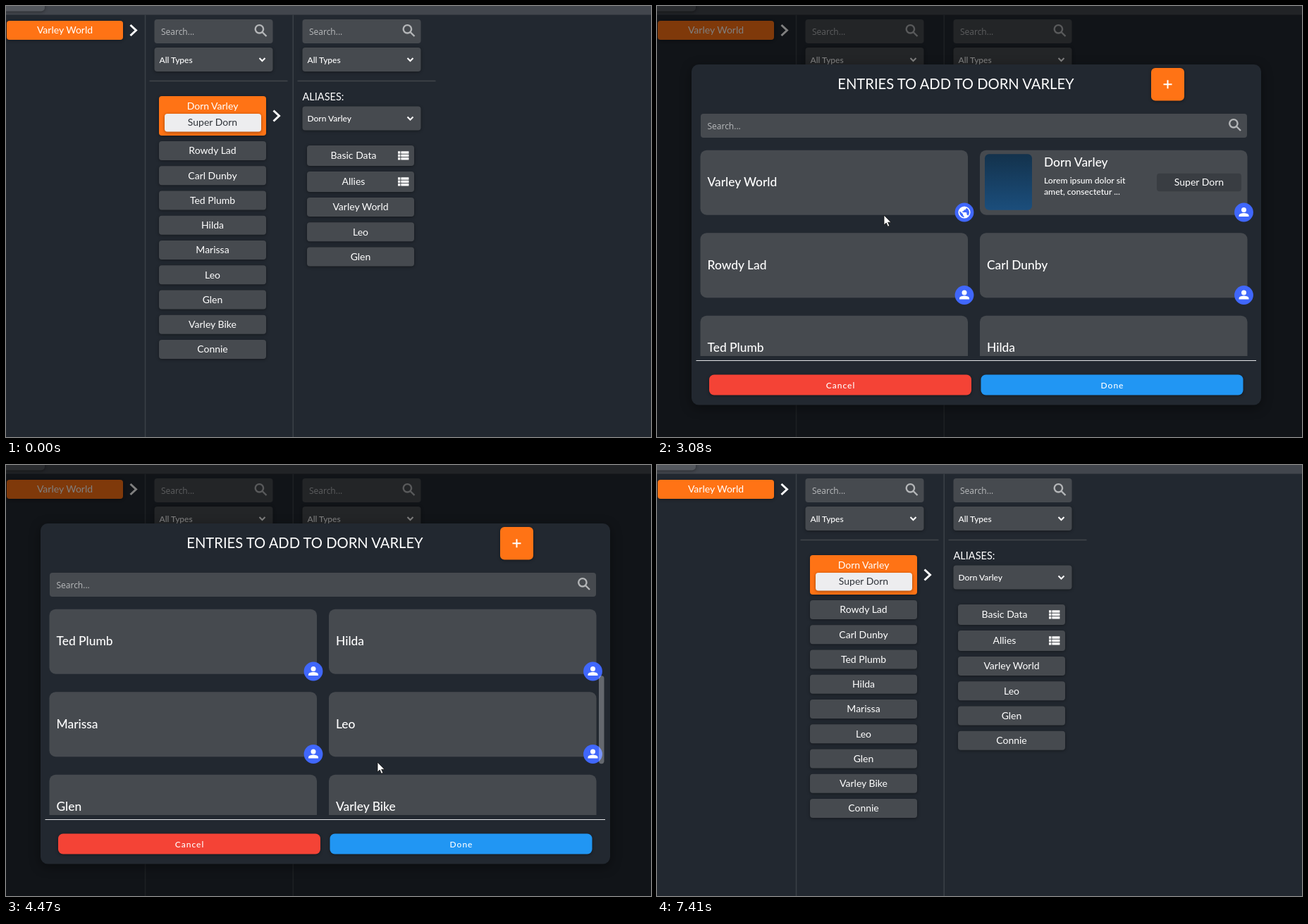
An HTML page that plays this animation: 915x612 px, repeating every 8.26 s.

```html
<!DOCTYPE html>
<html lang="en">
<head>
<meta charset="utf-8">
<title>Adding an entry</title>
<style>
  html, body { margin: 0; width: 100%; height: 100%; overflow: hidden; background: #222830; }
  svg { display: block; width: 915px; height: 612px; font-family: Lato, "Open Sans", sans-serif; fill: #fff; }
  .mid { text-anchor: middle; }
  .bold { font-weight: 500; }
  .wide { letter-spacing: 1px; }
  .hint { font: 12px "Open Sans", sans-serif; fill: #b9bbbd; }
  .lift { filter: drop-shadow(0 1px 2px rgba(0, 0, 0, .4)); }
  .line { fill: none; stroke: #fff; }
</style>
</head>
<body>
<svg id="stage" viewBox="0 0 915 612"></svg>
<script>
const ORANGE = '#ff7315', GREY = '#464a4f', BLUE = '#4067fb', BG = '#222830';
const HERO = 'Dorn Varley', HERO_ALIAS = 'Super Dorn';
const PEOPLE = ['Rowdy Lad', 'Carl Dunby', 'Ted Plumb', 'Hilda', 'Marissa', 'Leo', 'Glen', 'Varley Bike', 'Connie'];
const PITCH = 117.5, MAX_SCROLL = 407.5;

const rect = (x, y, w, h, r, fill, more = '') =>
  `<rect x="${x}" y="${y}" width="${w}" height="${h}" rx="${r}" fill="${fill}" ${more}/>`;
const text = (x, y, s, size, cls = '', more = '') =>
  `<text x="${x}" y="${y}" font-size="${size}" class="${cls}" ${more}>${s}</text>`;
const path = (d, width, more = '') => `<path class="line" d="${d}" stroke-width="${width}" ${more}/>`;
const group = (id, body, more = '') => `<g id="${id}" ${more}>${body}</g>`;

const lens = (x, y) => path(`M${x + 11.5} ${y + 11.5}l5.5 5.5M${x + 12.6} ${y + 6.8}a5.7 5.7 0 1 1-11.4 0a5.7 5.7 0 1 1 11.4 0`, 2.4, 'style="stroke:#b4b6b8"');
const searchBox = (x, y, w) => rect(x, y, w, 34, 4, GREY) + text(x + 9.5, y + 22, 'Search...', 12, 'hint') + lens(x + w - 26, y + 7);
const select = (x, y, s) => rect(x, y, 168, 34, 4, GREY, 'class="lift"') + text(x + 7, y + 21.5, s, 12, 'bold')
  + path(`M${x + 149} ${y + 15}l4 4 4-4`, 2);
const button = (x, y, s, h = 27) => rect(x, y, 152, h, 4, GREY, 'class="lift"') + text(x + 76, y + h / 2 + 4.8, s, 14, 'mid');
const chevron = (x, y) => path(`M${x} ${y - 7.5}l8 7.5-8 7.5`, 3);
const rows = (x, y) => [0, 4.4, 8.8].map(d => rect(x, y + d, 3.4, 3.4, 0, '#fff') + rect(x + 4.4, y + d, 11, 3.4, 0, '#fff')).join('');
const filters = x => searchBox(x, 19, 168) + select(x, 59, 'All Types') + rect(x - 7, 105.7, 196, 1.5, 0, '#41454b');

const person = '<circle cy="-3.4" r="3.5"/><path d="M-7 6V4.6C-7 1.8-2.5 1 0 1S7 1.8 7 4.6V6z"/>';
const globe = `<circle r="8.6"/><path fill="${BLUE}" d="M-6.6-1.8L-2 2.6V4l1.6 1.8V7C-4.5 6.6-7.4 2.4-6.6-1.8zM5.6 4.4L3.4 3.2V.8L2.4 0h-5v-1.8h1.8v-1.8h2l1.4-1.6V-6.4C7-4.4 8.2 1 5.6 4.4z"/>`;
const briefcase = `<path d="M-2.6-4V-6.2H2.6V-4" class="line" stroke-width="1.8"/>${rect(-8, -4, 16, 10.4, 1.8, '#fff')}
  <path d="M-8 1.2H-2M2 1.2H8M-2 1.2H2" stroke="${BLUE}" stroke-width="1.3"/>${rect(-1.8, -.4, 3.6, 3.4, .6, BLUE)}`;

const heroDetails = (x, y) =>
  rect(x + 7, y + 5.5, 67, 79.5, 6, 'url(#cover)')
  + text(x + 91, y + 23, HERO, 17.4, 'bold')
  + text(x + 91, y + 47, 'Lorem ipsum dolor sit', 12.2, 'bold') + text(x + 91, y + 63, 'amet, consectetur ...', 12.2, 'bold')
  + rect(x + 251, y + 33, 120, 25.5, 4, '#393d42') + text(x + 311, y + 50, HERO_ALIAS, 14, 'mid');

function card(name, i) {
  const x = i % 2 ? 458 : 61.5, y = 204.7 + (i >> 1) * PITCH;
  const icon = i === 0 ? globe : name === 'Varley Bike' ? briefcase : person;
  return rect(x, y, 379.5, 92, 9, GREY)
    + (name === HERO ? heroDetails(x, y) : text(x + 10, y + 51.5, name, 17.4, 'bold'))
    + (name === 'Connie' ? rect(x - 2.3, y - 2.8, 384.2, 97.4, 9, 'none', `id="picked" stroke="${BLUE}" stroke-width="4"`) : '')
    + `<g transform="translate(${x + 374.5} ${y + 88.3})"><circle r="13.4" fill="${BLUE}"/>${icon}</g>`;
}

const page =
  rect(0, 0, 915, 12.5, 0, '#42464d') + rect(-6, -12, 61, 19.5, 5, '#54585e', 'class="lift"')
  + rect(1, 21, 165, 27, 4, ORANGE, 'class="lift"') + text(83.5, 39, 'Varley World', 14, 'mid') + chevron(176.5, 34.5)
  + rect(196.8, 12.5, 1.5, 600, 0, '#3b4047') + rect(406.5, 12.5, 1.5, 600, 0, '#3b4047')
  + filters(210.5) + filters(420.5)
  + rect(217, 128, 152, 56, 4, ORANGE, 'class="lift"') + text(293, 146.5, HERO, 14, 'mid')
  + rect(225, 153, 137, 25.5, 4, '#ededef', 'class="lift"') + text(293, 170, HERO_ALIAS, 14, 'mid', 'fill="#30343a"')
  + chevron(379.5, 156)
  + PEOPLE.map((s, i) => button(217, 192 + i * 35.25, s)).join('')
  + text(420.5, 133.5, 'ALIASES:', 14.5) + select(420.5, 142.5, HERO)
  + [['Basic Data', 198], ['Allies', 235]].map(([s, y]) =>
      rect(427, y, 152, 29, 4, GREY, 'class="lift"') + text(493, y + 19, s, 14, 'mid') + rows(556, y + 8.3)).join('')
  + button(427, 272, 'Varley World') + button(427, 307.2, 'Leo') + button(427, 342.5, 'Glen')
  + group('added', button(427, 377.7, 'Connie'));

const menu = `<g clip-path="url(#menuClip)">${rect(337.5, 345, 191.5, 59, 0, '#393c43')}
  ${rect(337.5, 345, 191.5, 29.5, 0, ORANGE, 'id="hover"')}</g>`
  + text(351, 364, 'Add Entry To ' + HERO, 12.2, 'wide') + text(351, 393, 'Add Group To ' + HERO, 12.2, 'wide');

const dialog =
  rect(0, 0, 915, 612, 0, '#000', 'opacity=".5"')
  + rect(49, 83, 808, 483.5, 10, BG, 'style="filter:drop-shadow(0 4px 8px rgba(0,0,0,.4))"')
  + text(424, 118, 'ENTRIES TO ADD TO ' + HERO.toUpperCase(), 20.2, 'mid')
  + rect(701, 88, 47, 46.5, 6, ORANGE, 'class="lift"') + path('M718.5 111.2h12M724.5 105.2v12', 2)
  + searchBox(62, 153, 775)
  + `<g clip-path="url(#listClip)">${group('list', ['Varley World', HERO, ...PEOPLE].map(card).join(''))}
     ${rect(841, 200, 7.5, 125, 3.7, '#fff', 'id="thumb"')}</g>`
  + rect(55.5, 503, 794.5, 1, 0, '#e4e6e8')
  + rect(74, 523.5, 372, 29, 7, '#f44336', 'class="lift"') + text(260.5, 542.5, 'Cancel', 12, 'mid bold wide')
  + rect(459.5, 523.5, 372, 29, 7, '#2196f3', 'class="lift"') + text(646, 542.5, 'Done', 12, 'mid bold wide');

const pointer =
  '<path id="arrow" d="M0 0V14l3.2-3 2.3 5.2 2.4-1L5.6 10.2H10z" stroke="#111" stroke-width=".8"/>'
  + '<path id="hand" d="M-1.7 1.5a1.7 1.7 0 0 1 3.4 0V6.5l5.5 1.2q2 .5 1.7 2.6l-.7 4q-.4 2.5-1.5 3.7h-6.5q-1.4-1.2-2.2-2.8l-3-4.5q.5-2 2.3-.9l1 1z" stroke="#111" stroke-width=".9"/>';

stage.innerHTML = `<defs>
  <linearGradient id="cover" x2="0" y2="1"><stop stop-color="#13324c"/><stop offset="1" stop-color="#1b4e7c"/></linearGradient>
  <clipPath id="menuClip">${rect(337.5, 345, 191.5, 59, 8, '#fff')}</clipPath>
  <clipPath id="listClip">${rect(50, 200, 800, 297, 0, '#fff')}</clipPath></defs>`
  + page + group('menu', menu) + group('dialog', dialog)
  + '<circle id="ring" cx="529" cy="404" r="10" fill="#fff" opacity=".3"/>' + group('cursor', pointer);

const LOOP = 8260;
// Keys are [time, ...values]
const CURSOR = [
  [40, 840, 618], [590, 529, 404], [1230, 529, 404], [1300, 515, 389], [1600, 480, 361], [2400, 480, 361],
  [3080, 322, 297], [3600, 322, 297], [3690, 339, 331], [4150, 505, 412], [4300, 505, 412], [4470, 527, 422],
  [5090, 217, 431], [5120, 217, 431], [5320, 193, 433], [5480, 193, 433], [6090, 565, 533], [6790, 565, 533],
  [7410, 832, 628]
];
const SCROLL = [[3120, 0], [3390, PITCH], [3590, PITCH], [3745, 2 * PITCH], [4600, 2 * PITCH], [5000, MAX_SCROLL]];

const $ = id => document.getElementById(id);
const show = (id, on) => $(id).setAttribute('display', on ? 'inline' : 'none');
const set = (id, name, value) => $(id).setAttribute(name, value);
const ramp = (t, a, b) => Math.min(1, Math.max(0, (t - a) / (b - a)));
const ease = p => p * p * (3 - 2 * p);

function along(keys, t) {
  const next = keys.findIndex(k => k[0] >= t);
  const n = next < 0 ? keys.length - 1 : Math.max(1, next);
  const [a, b] = [keys[n - 1], keys[n]], p = ease(ramp(t, a[0], b[0]));
  return a.slice(1).map((v, j) => v + (b[j + 1] - v) * p);
}

function draw(t) {
  const [x, y] = along(CURSOR, t), [scroll] = along(SCROLL, t);
  const fade = ramp(t, 1860, 2150) - ramp(t, 6260, 6550);
  const onMenu = t >= 1260 && t < 1900;
  const hand = onMenu || (t > 5500 && t < 6400 && y > 524);

  show('added', t >= 6260);
  show('menu', t >= 970 && t < 1900);
  show('hover', onMenu);
  set('hover', 'y', y > 375 ? 374.5 : 345);
  show('ring', t >= 820 && t < 970);

  show('dialog', fade > 0);
  set('dialog', 'opacity', fade);
  set('list', 'transform', `translate(0 ${-scroll})`);
  set('thumb', 'y', 200 + scroll * 172 / MAX_SCROLL);
  set('thumb', 'opacity', .3 * (ramp(t, 3120, 3200) - ramp(t, 5425, 5500)));
  show('picked', t >= 5460);

  show('cursor', t >= 60 && t < 7400);
  set('cursor', 'transform', `translate(${x} ${y})`);
  show('hand', hand);
  show('arrow', !hand);
}

let start;
function tick(now) {
  start ??= now;
  draw((now - start) % LOOP);
  requestAnimationFrame(tick);
}
draw(0);
requestAnimationFrame(tick);
</script>
</body>
</html>
```
